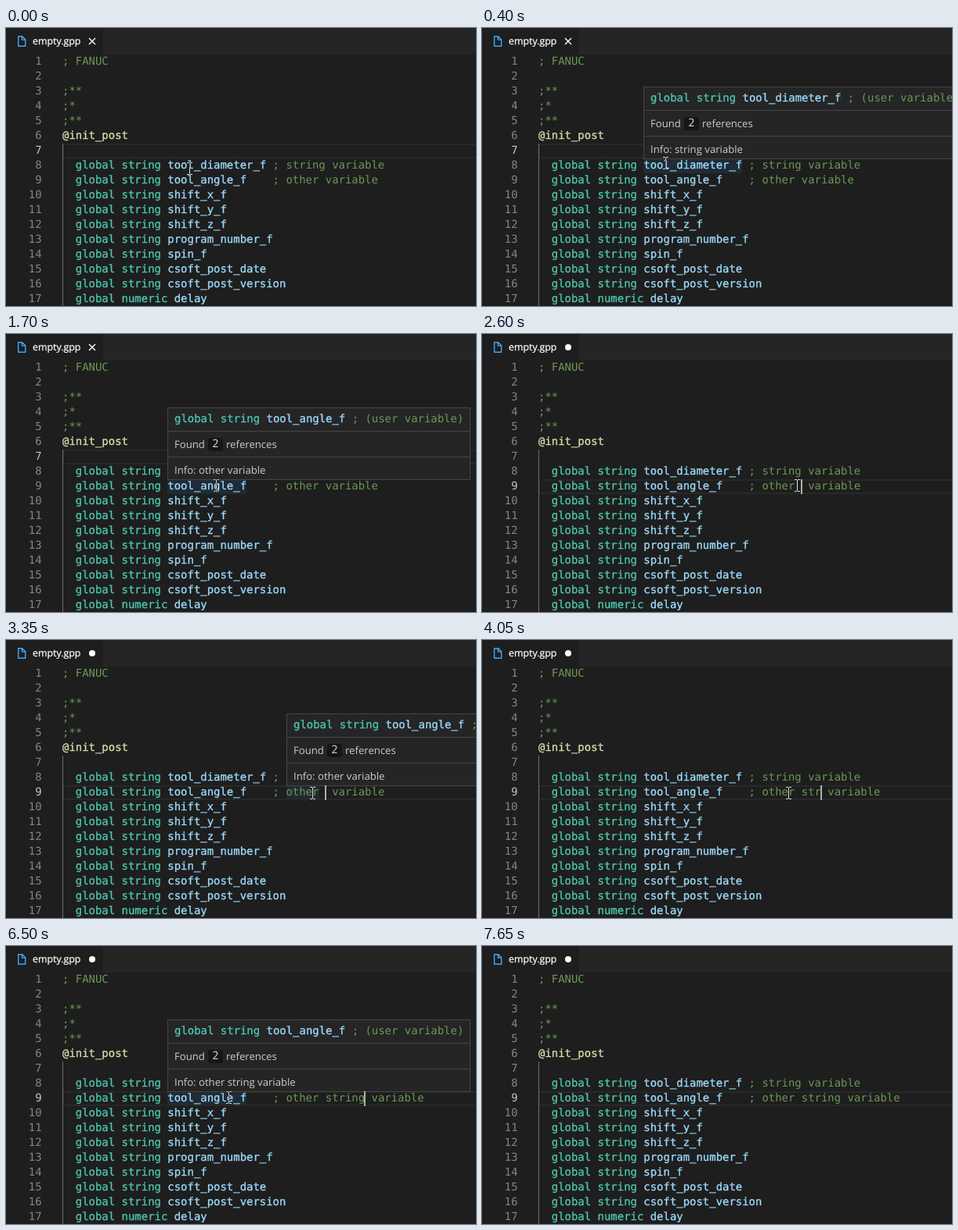
Animation of 600x356 px, one loop 8.1 s. Source, as an HTML page:

```html
<!DOCTYPE html>
<html lang="en">
<head>
<meta charset="utf-8">
<title>Editor hover info</title>
<style>
  html, body { margin: 0; width: 100%; height: 100%; overflow: hidden; background: #1e1e1e; }
  #stage {
    position: relative; width: 600px; height: 356px; overflow: hidden; background: #1e1e1e;
    color: #d4d4d4; text-rendering: geometricPrecision; isolation: isolate;
    --mono: 13.953px "DejaVu Sans Mono", "Noto Sans Mono", monospace;
    --ui: "Open Sans", "Noto Sans", sans-serif;
  }
  #stage > * { position: absolute; }
  .bar { left: 124px; top: 0; right: 0; height: 34px; background: #252526; }
  .tab { left: 34px; top: 7px; font: 12.4px/20px var(--ui); color: #fff; -webkit-text-stroke: .25px; }
  .icons { left: 0; top: 0; fill: none; }
  .current { left: 72px; right: 0; height: 19px; box-sizing: border-box; border: 2px solid #282828; border-right: 0; }
  .guide { left: 72px; top: 148px; bottom: 0; width: 1px; background: #707070; }
  .line { left: 0; width: 600px; height: 19px; white-space: pre; font: var(--mono); line-height: 19px; }
  .num { position: absolute; right: 554.4px; color: #858585; }
  .num.on { color: #c6c6c6; }
  .line code { position: absolute; left: 72px; }
  code { font: inherit; }
  .k, .v, .f { -webkit-text-stroke: .3px; }
  .k { color: #4ec9b0; }
  .v { color: #9cdcfe; }
  .c { color: #6a9955; }
  .f { color: #dcdcaa; }
  .caret { top: 186px; width: 2px; height: 19px; background: #aeafad; }
  .word { height: 19px; background: #264f78; opacity: 0; }
  .hover {
    box-sizing: border-box; height: 93px; border: 1px solid #454545; background: #252526;
    white-space: pre; color: #ccc; font: 13.15px/32px var(--ui); opacity: 0;
  }
  .hover div { position: relative; box-sizing: border-box; padding: 0 8px; }
  .hover div + div { border-top: 1px solid #454545; height: 33px; }
  .hover .code { height: 29px; font: var(--mono); line-height: 28px; }
  .hover .refs { position: absolute; left: 74px; }
  .hover .count {
    position: absolute; left: 51px; top: 8px; width: 19px; height: 17px; border-radius: 3px;
    background: #161617; text-align: center; font: var(--mono); line-height: 17px;
  }
  .mouse { left: 0; top: 0; mix-blend-mode: difference; }
  .mouse svg { display: block; }
</style>
</head>
<body>
<div id="stage">
  <div class="bar"></div>
  <div class="tab">empty.gpp</div>
  <svg class="icons" width="124" height="34">
    <path d="M15.7 10.7h5l4 4v8.6h-9zM20.4 10.9v4.2h4.2" stroke="#42a5f5" stroke-width="1.4" stroke-linejoin="round"/>
    <path id="close" d="M106 13l8 8M114 13l-8 8" stroke="#fff" stroke-width="1.4"/>
    <circle id="dirty" cx="110" cy="17" r="4" fill="#fff"/>
  </svg>
  <div class="current" id="current"></div>
  <div class="guide"></div>
</div>
<script>
const LOOP = 8100, FRAME = 50, FADE = 150, BLINK = 368;
const CHAR = 8.4, LEFT = 72, CLICK = 2350;
const stage = document.getElementById('stage');
const byId = id => document.getElementById(id);
const lineTop = n => 15 + 19 * n;

function add(cls, html = '', style = {}) {
  const el = document.createElement('div');
  el.className = cls;
  el.innerHTML = html;
  Object.assign(el.style, style);
  stage.append(el);
  return el;
}

const span = (cls, text) => `<span class="${cls}">${text}</span>`;

function paint(text) {
  const [, code, note] = text.match(/^([^;]*)(.*)$/);
  return code.replace(/@?\w+/g, w =>
    span(w[0] === '@' ? 'f' : /^(global|string|numeric)$/.test(w) ? 'k' : 'v', w)
  ) + (note && span('c', note));
}

const lines = `; FANUC

;**
;*
;**
@init_post

  global string tool_diameter_f ; string variable
  global string tool_angle_f    ; other<i id="typed"></i> variable
  global string shift_x_f
  global string shift_y_f
  global string shift_z_f
  global string program_number_f
  global string spin_f
  global string csoft_post_date
  global string csoft_post_version
  global numeric delay`.split('\n');

const numbers = lines.map((text, i) =>
  add('line', span('num', i + 1) + `<code>${paint(text)}</code>`, { top: lineTop(i + 1) + 'px' }).firstChild);
const typedEl = byId('typed');
typedEl.style.fontStyle = 'normal';

const cards = [
  { show: 300, hide: 1000, line: 8, word: 'tool_diameter_f', info: 'string variable' },
  { show: 1250, hide: 1750, line: 9, word: 'tool_angle_f', info: 'other variable' },
  { show: 3000, hide: 3450, line: 9, word: 'other', name: 'tool_angle_f', info: 'other variable' },
  { show: 6300, hide: 7350, line: 9, word: 'tool_angle_f', info: 'other string variable' }
];
for (const card of cards) {
  const { line, word, name = word, info } = card;
  const x = LEFT + lines[line - 1].indexOf(word) * CHAR, top = lineTop(line);
  card.mark = add('word', '', { left: x + 'px', top: top + 'px', width: word.length * CHAR + 'px' });
  stage.insertBefore(card.mark, byId('current'));
  card.box = add('hover',
    `<div class="code">${paint(`global string ${name} ; (user variable)`)}</div>` +
    `<div>Found${span('count', 2)}${span('refs', 'references')}</div>` +
    `<div>Info: ${info}</div>`,
    { left: Math.round(x) + 'px', top: top - 92 + 'px' });
}

const caret = add('caret');
const mouse = add('mouse',
  '<svg width="7" height="16"><path fill="#fff" d="M0 0h3v1h1v-1h3v1h-3v14h3v1h-3v-1h-1v1h-3v-1h3v-14h-3z"/></svg>');

const start = { x: 231, y: 172 };
const moves = [
  { from: 50, to: 100, x: 231, y: 165 },
  { from: 900, to: 1100, x: 230, y: 186 },
  { from: 1650, to: 1950, x: 408, y: 186 },
  { from: 2100, to: 2150, x: 400, y: 186 },
  { from: 2600, to: 2800, x: 388, y: 188 },
  { from: 5650, to: 6000, x: 281, y: 186 },
  { from: 7250, to: 7500, x: 300, y: 400 }
];
const keyTimes = [2600, 3450, 3950, 4050, 4450, 4800, 5050];

const clamp = v => Math.min(1, Math.max(0, v));
const smooth = p => p * p * (3 - 2 * p);

function mouseAt(t) {
  return moves.reduce((pos, m) => {
    const p = smooth(clamp((t - m.from + FRAME) / (m.to - m.from + FRAME)));
    return { x: pos.x + (m.x - pos.x) * p, y: pos.y + (m.y - pos.y) * p };
  }, start);
}

function draw(now) {
  const t = Math.floor(now % LOOP / FRAME) * FRAME;

  const { x, y } = mouseAt(t);
  mouse.style.transform = `translate(${Math.round(x)}px, ${Math.round(y)}px)`;

  for (const { show, hide, box, mark } of cards) {
    const on = t >= show && t < hide;
    box.style.opacity = on ? clamp((t - show + FRAME) / FADE) : 0;
    mark.style.opacity = on ? .25 : 0;
  }

  const typed = keyTimes.filter(k => k <= t).length;
  typedEl.textContent = ' string'.slice(0, typed);
  byId('close').style.display = typed ? 'none' : '';
  byId('dirty').style.display = typed ? '' : 'none';

  // Every keystroke restarts the caret's blink
  const since = t - (typed ? keyTimes[typed - 1] : CLICK);
  const lit = t >= CLICK && Math.floor((since + FRAME / 2) / BLINK) % 2 === 0;
  caret.style.left = Math.round(LEFT + (39 + typed) * CHAR - 1) + 'px';
  caret.style.opacity = lit ? 1 : 0;

  const active = t < CLICK ? 7 : 9;
  byId('current').style.top = lineTop(active) + 'px';
  numbers.forEach((n, i) => n.classList.toggle('on', i + 1 === active));
}

function tick() {
  draw(performance.now());
  requestAnimationFrame(tick);
}
tick();
</script>
</body>
</html>
```
